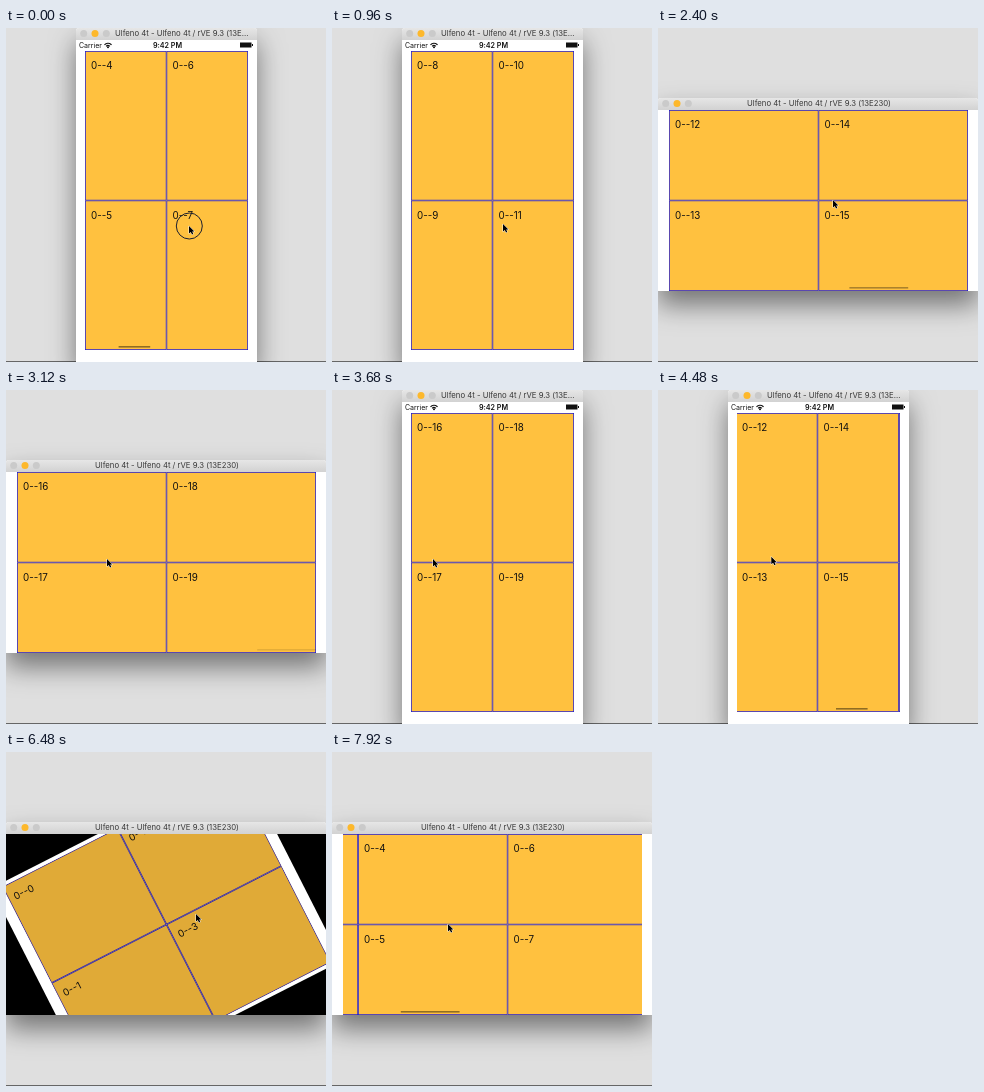
An HTML page with a canvas that plays this animation: 320x334 px, repeating every 8000 ms.

```html
<!DOCTYPE html>
<html lang="en">
<head>
<meta charset="utf-8">
<title>Paged grid rotation</title>
<style>
  html, body { margin: 0; width: 100%; height: 100%; overflow: hidden; background: #dfdfdf; }
  canvas { display: block; width: 320px; height: 334px; }
</style>
</head>
<body>
<canvas id="stage" width="320" height="334"></canvas>
<script>
const ctx = document.getElementById('stage').getContext('2d');
const LOOP = 8000, PAGES = 5, FIRST_PAGE = 1, FONT = 'Inter, Roboto, sans-serif';
const CENTER = { x: 160.5, y: 172.5 };
const TITLE = 'Ulfeno 4t - Ulfeno 4t / rVE 9.3 (13E';
const TITLE_BAR = 12;

const PORTRAIT = { x: 70, y: 0, w: 181, h: 335, gridW: 163, gridH: 299, tail: '...', titleX: 109 };
const LANDSCAPE = { x: 0, y: 70, w: 320, h: 193, gridW: 299, gridH: 181, tail: '230)', titleX: 89 };

const TURNS = [1040, 3440, 6400];
const PRESS_LEAD = 60, DRAG = 180, RETURN = 180;

// Each swipe starts at (x, y); the pointer then travels to the next starting point.
const forward = (at, x, y) => ({ at, x, y, step: 1, length: 540, reach: -74 });
const backward = i => ({ at: 4120 + 440 * i, x: 101 + 12.3 * i, y: 169 - 2.3 * i, step: -1, length: 460, reach: 52 });
const swipes = [
  forward(60, 183, 198), forward(1880, 171, 196), forward(2540, 175, 172),
  ...[0, 1, 2, 3].map(backward),
  forward(7580, 190, 162)
];
const REST = { x: 116, y: 172 };

const clamp = v => Math.max(0, Math.min(1, v));
const smooth = v => v * v * (3 - 2 * v);
const mix = (a, b, p) => a + (b - a) * p;

function box(x, y, w, h, color) {
  ctx.fillStyle = color;
  ctx.fillRect(x, y, w, h);
}

function disc(x, y, r, color) {
  ctx.fillStyle = color;
  ctx.beginPath();
  ctx.arc(x, y, r, 0, 7);
  ctx.fill();
}

function roundedTop(x, y, w, h, fill) {
  ctx.fillStyle = fill;
  ctx.beginPath();
  ctx.roundRect(x, y, w, h, [3, 3, 0, 0]);
  ctx.fill();
}

function text(str, x, y, size, color = '#111', weight = 400, align = 'left') {
  ctx.font = `${weight} ${size}px ${FONT}`;
  ctx.textAlign = align;
  ctx.fillStyle = color;
  ctx.fillText(str, x, y);
}

function drawDesktop() {
  box(0, 0, 320, 334, '#dfdfdf');
  box(0, 333, 320, 1, '#666');
}

function drawWindow({ x, y, w, h, tail, titleX }) {
  ctx.save();
  ctx.shadowColor = 'rgba(0,0,0,.48)';
  ctx.shadowBlur = 27;
  ctx.shadowOffsetY = 14;
  roundedTop(x, y, w, h, '#fff');
  ctx.restore();

  const bar = ctx.createLinearGradient(0, y, 0, y + TITLE_BAR);
  bar.addColorStop(0, '#e6e6e6');
  bar.addColorStop(1, '#d2d2d2');
  roundedTop(x, y, w, TITLE_BAR, bar);
  ['#cacaca', '#fdb82b', '#cacaca'].forEach((c, i) => disc(x + 7.7 + i * 11.3, y + 5.4, 3.5, c));
  text(TITLE + tail, titleX, y + 8.2, 7.75, '#383838');
}

function drawStatusBar() {
  text('Carrier', 73, 19.7, 7);
  text('9:42 PM', 161.5, 19.7, 7.2, '#111', 600, 'center');
  ctx.strokeStyle = '#111';
  ctx.lineWidth = 1.1;
  for (const r of [2.5, 4.7]) {
    ctx.beginPath();
    ctx.arc(102, 20, r, -Math.PI * .77, -Math.PI * .23);
    ctx.stroke();
  }
  disc(102, 19.3, 1, '#111');
  box(234, 14.5, 11.5, 5, '#111');
  box(246, 16, 1, 2, '#111');
}

function drawPage(page, x, y, w, h) {
  for (let i = 0; i < 4; i++) {
    const cx = x + (i >> 1) * w / 2, cy = y + (i % 2) * h / 2;
    box(cx, cy, w / 2, h / 2, '#ffc13f');
    ctx.strokeStyle = '#1414e0';
    ctx.lineWidth = .7;
    ctx.strokeRect(cx + .35, cy + .35, w / 2 - .7, h / 2 - .7);
    text(`0--${page * 4 + i}`, cx + 6, cy + 18, 9.8);
  }
}

function drawGrid(w, h, offset, dim, barAlpha) {
  const x = -w / 2, y = -h / 2;
  ctx.save();
  ctx.beginPath();
  ctx.rect(x, y, w, h);
  ctx.clip();
  for (let p = Math.floor(offset); p <= Math.ceil(offset); p++) {
    drawPage(p, x + (p - offset) * w, y, w, h);
  }
  box(x, y, w, h, `rgba(0,0,0,${dim})`);
  box(x + 1 + offset * w / PAGES, y + h - 4, w / PAGES - 1, 1.6, `rgba(0,0,0,${barAlpha})`);
  ctx.restore();
}

function drawScreen(t, win, other, turn, index) {
  const { at, step, length } = swipes[index];
  const from = swipes.slice(0, index).reduce((page, s) => page + s.step, FIRST_PAGE);
  const glide = smooth(1 - (1 - clamp((t - at) / length)) ** 2);
  const fade = clamp((t - at - length + 50) / 120);
  const between = pick => mix(pick(other), pick(win), turn);
  const bodyH = s => s.h - TITLE_BAR;

  ctx.save();
  ctx.beginPath();
  ctx.rect(win.x, win.y + TITLE_BAR, win.w, bodyH(win));
  ctx.clip();
  if (turn < 1) box(0, 0, 320, 334, '#000');
  ctx.translate(CENTER.x, CENTER.y);
  ctx.rotate((win === PORTRAIT ? 1 : -1) * (1 - turn) * Math.PI / 2);
  const w = between(s => s.w) + 1, h = between(bodyH);
  box(-w / 2, -h / 2, w, h, '#fff');
  drawGrid(between(s => s.gridW), between(s => s.gridH), from + step * glide,
    .15 * Math.sin(Math.PI * turn), .44 * (1 - fade));
  ctx.restore();
}

function drawPointer(t, index) {
  const { at, x, y, reach } = swipes[index], next = swipes[index + 1] || REST;
  const drag = smooth(clamp((t - at) / DRAG));
  const back = smooth(clamp((t - at - DRAG) / RETURN));
  const pressed = swipes.some(s => t >= s.at - PRESS_LEAD && t < s.at + DRAG);

  ctx.save();
  ctx.translate(mix(x + reach * drag, next.x, back), mix(y, next.y, drag));
  if (pressed) {
    ctx.strokeStyle = '#1c2030';
    ctx.lineWidth = 1;
    ctx.beginPath();
    ctx.arc(.3, 0, 13, 0, 7);
    ctx.stroke();
  }
  const arrow = new Path2D('M0 0V7.6L1.8 6 3 8.6 4.3 8 3.2 5.5H5.4Z');
  ctx.strokeStyle = '#fff';
  ctx.lineWidth = .9;
  ctx.stroke(arrow);
  ctx.fillStyle = '#000';
  ctx.fill(arrow);
  ctx.restore();
}

function draw(t) {
  const turned = TURNS.filter(at => at <= t).length;
  const [win, other] = turned % 2 ? [LANDSCAPE, PORTRAIT] : [PORTRAIT, LANDSCAPE];
  // The window flips while the screen turn is already under way.
  const turn = turned ? smooth(clamp((t - TURNS[turned - 1] + 110) / 300)) : 1;
  const index = Math.max(0, swipes.filter(s => s.at <= t).length - 1);

  drawDesktop();
  drawWindow(win);
  drawScreen(t, win, other, turn, index);
  if (win === PORTRAIT && turn === 1) drawStatusBar();
  drawPointer(t, index);
}

function tick() {
  draw(performance.now() % LOOP);
  requestAnimationFrame(tick);
}
tick();
</script>
</body>
</html>
```
